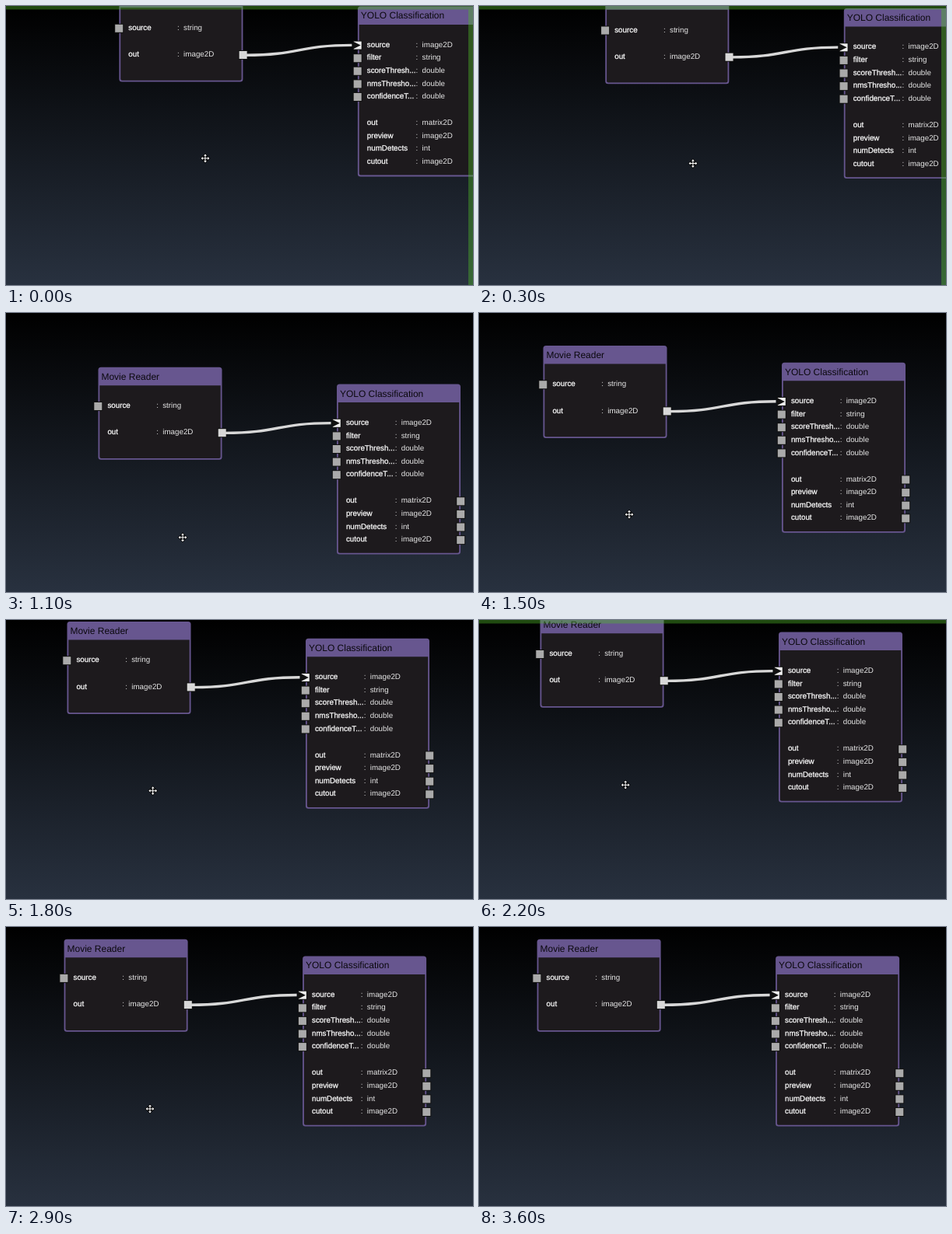
Write an HTML page with a canvas that moves like this. It is 600 px wide and 359 px high and loops after 3.7 s.

```html
<!DOCTYPE html>
<html lang="en">
<head>
<meta charset="utf-8">
<title>Node editor panning</title>
<style>
  html, body { margin: 0; width: 100%; height: 100%; overflow: hidden; background: #000; }
  canvas { display: block; width: 600px; height: 359px; }
</style>
</head>
<body>
<canvas id="stage"></canvas>
<script>
const W = 600, H = 359, LOOP = 3700, STEP = 100;
const FONT = '"Liberation Sans", Arial, sans-serif';
const PURPLE = '#67568f', BODY = '#1d1a1d', PORT = '#aaa', LIT = '#d8d8d8';
const GLOW = 'rgba(80, 186, 42, 0.4)';

const canvas = document.getElementById('stage');
const ctx = canvas.getContext('2d');
const dpr = window.devicePixelRatio || 1;
canvas.width = Math.round(W * dpr);
canvas.height = Math.round(H * dpr);
ctx.textRendering = 'geometricPrecision';

const sky = ctx.createLinearGradient(0, 0, 0, H);
sky.addColorStop(0, '#000');
sky.addColorStop(1, '#28313f');

// Time, then x and y of the graph's corner
const panKeys = [
  [0, 145.4, -21.4], [700, 188.3, -8], [1100, 118.5, 69.8], [1250, 106, 74],
  [1500, 82.5, 42], [1800, 78.5, 2], [2000, 78.5, -9], [2200, 78.5, -6.2],
  [2400, 77, -2], [2600, 75.5, 10], [2900, 74.6, 15.7]
];
// Cursor relative to that corner
const gripKeys = [
  [0, 110.6, 217.4], [700, 115.7, 227.3], [1100, 108.5, 219], [1500, 110.5, 217.2],
  [2200, 109.7, 218.4], [2900, 110.4, 218.4]
];
const CURSOR_END = 3200;

const reader = {
  title: 'Movie Reader', dx: 0, dy: 0, w: 159, h: 119,
  rows: [
    { name: 'source', type: 'string', y: 49, side: 0 },
    { name: 'out', type: 'image2D', y: 83.2, side: 1, lit: true }
  ]
};
const inputs = [['source', 'image2D'], ['filter', 'string'], ['scoreThresh...', 'double'],
  ['nmsThresho...', 'double'], ['confidenceT...', 'double']];
const outputs = [['out', 'matrix2D'], ['preview', 'image2D'], ['numDetects', 'int'],
  ['cutout', 'image2D']];
const toRows = (list, top, side) => list.map(([name, type], i) =>
  ({ name, type, side, y: top + i * 16.6, linked: side === 0 && i === 0 }));
const detector = {
  title: 'YOLO Classification', dx: 306.5, dy: 21.8, w: 159, h: 219,
  rows: [...toRows(inputs, 49, 0), ...toRows(outputs, 149.5, 1)]
};

// Monotone cubic interpolation through the keys
function track(keys, t, c) {
  const last = keys.length - 1;
  if (t >= keys[last][0]) return keys[last][c];
  const slope = i => (keys[i + 1][c] - keys[i][c]) / (keys[i + 1][0] - keys[i][0]);
  const tangent = i => {
    if (i === 0 || i === last) return 0;
    const a = slope(i - 1), b = slope(i);
    return a * b <= 0 ? 0 : 2 * a * b / (a + b);
  };
  let i = 0;
  while (t >= keys[i + 1][0]) i++;
  const d = keys[i + 1][0] - keys[i][0];
  const u = (t - keys[i][0]) / d, v = 1 - u;
  return (1 + 2 * u) * v * v * keys[i][c] + u * v * v * d * tangent(i) +
    u * u * (3 - 2 * u) * keys[i + 1][c] - u * u * v * d * tangent(i + 1);
}

function text(str, x, y, size, color, weight = 0) {
  ctx.font = size + 'px ' + FONT;
  ctx.fillStyle = ctx.strokeStyle = color;
  ctx.fillText(str, x, y);
  if (!weight) return;
  ctx.lineWidth = weight;
  ctx.strokeText(str, x, y);
}

function port(x, y, row) {
  ctx.fillStyle = '#111';
  ctx.fillRect(x - 6, y - 6, 12, 12);
  ctx.fillStyle = row.linked ? '#eee' : row.lit ? LIT : PORT;
  ctx.fillRect(x - 5, y - 5, 10, 10);
  if (!row.linked) return;
  ctx.fillStyle = '#111';
  ctx.beginPath();
  ctx.moveTo(x - 6, y - 5);
  ctx.lineTo(x + 4, y);
  ctx.lineTo(x - 6, y + 5);
  ctx.fill();
}

function drawNode(node, ox, oy) {
  const x = ox + node.dx, y = oy + node.dy;
  ctx.beginPath();
  ctx.roundRect(x, y, node.w, node.h, 3.5);
  ctx.fillStyle = PURPLE;
  ctx.fill();
  ctx.beginPath();
  ctx.roundRect(x + 1.8, y + 23.5, node.w - 3.6, node.h - 25.3, [0, 0, 2, 2]);
  ctx.fillStyle = BODY;
  ctx.fill();
  text(node.title, x + 3.9, y + 15.9, 12, '#0b090e');
  for (const row of node.rows) {
    const base = y + row.y + 3.3;
    text(row.name, x + 11.9, base, 9.8, '#fff', 0.25);
    text(':', x + 74.7, base, 9.8, '#ddd');
    text(row.type, x + 82.7, base, 9.8, '#e6e6e6');
    port(x + (row.side ? node.w + 0.2 : -0.2), y + row.y + 1.2, row);
  }
}

function drawWire(ox, oy) {
  const x0 = ox + 163, y0 = oy + 84.6, x1 = ox + 299, y1 = oy + 71.8;
  const mid = (x0 + x1) / 2;
  ctx.beginPath();
  ctx.moveTo(x0, y0);
  ctx.bezierCurveTo(mid, y0, mid, y1, x1, y1);
  ctx.strokeStyle = LIT;
  ctx.lineWidth = 3.4;
  ctx.stroke();
}

function cursorPath() {
  ctx.beginPath();
  for (let i = 0; i < 4; i++) {
    const c = Math.cos(i * Math.PI / 2), s = Math.sin(i * Math.PI / 2);
    const go = (fn, a, b) => ctx[fn](a * c - b * s, a * s + b * c);
    go('moveTo', 0, -0.5);
    go('lineTo', 3.2, -0.5);
    go('lineTo', 3.2, -2);
    go('lineTo', 5.4, 0);
    go('lineTo', 3.2, 2);
    go('lineTo', 3.2, 0.5);
    go('lineTo', 0, 0.5);
    ctx.closePath();
  }
}

function drawCursor(x, y) {
  ctx.save();
  ctx.translate(x, y);
  cursorPath();
  ctx.strokeStyle = '#000';
  ctx.lineWidth = 1.4;
  ctx.stroke();
  ctx.fillStyle = '#fff';
  ctx.fill();
  ctx.restore();
}

function draw(t) {
  const ox = track(panKeys, t, 1), oy = track(panKeys, t, 2);
  ctx.setTransform(dpr, 0, 0, dpr, 0, 0);
  ctx.fillStyle = sky;
  ctx.fillRect(0, 0, W, H);
  drawNode(reader, ox, oy);
  drawNode(detector, ox, oy);
  drawWire(ox, oy);

  // Edges glow where the graph runs off the view
  ctx.fillStyle = GLOW;
  const right = ox + detector.dx + detector.w > W;
  if (oy < 0) ctx.fillRect(0, 0, right ? W - 6 : W, 4.5);
  if (right) ctx.fillRect(W - 6, 0, 6, H);

  if (t < CURSOR_END) drawCursor(ox + track(gripKeys, t, 1), oy + track(gripKeys, t, 2));
}

const start = performance.now();
function tick() {
  const t = (performance.now() - start) % LOOP;
  draw(Math.floor(t / STEP) * STEP);
  requestAnimationFrame(tick);
}
tick();
</script>
</body>
</html>
```
